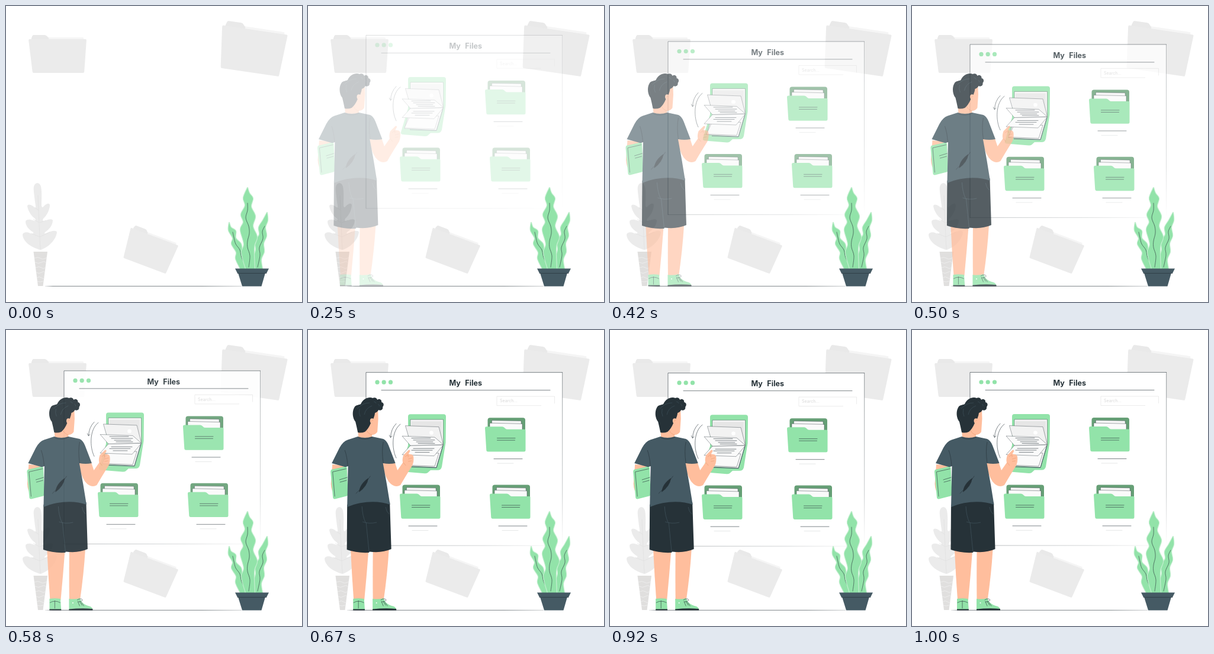
An HTML page that plays this animation: 500 by 500 pixels, repeating every 1040 ms.

```html
<!DOCTYPE html>
<html lang="en">
<head>
<meta charset="utf-8">
<title>My Files</title>
<style>
  html, body { margin: 0; width: 100%; height: 100%; overflow: hidden; background: #fff; }
  svg { display: block; width: 100vw; height: 100vh; }
  text { font-family: Inter, "Open Sans", sans-serif; }
  .thin { fill: none; stroke: #263238; stroke-width: .6; stroke-linecap: round; stroke-linejoin: round; }
  .sheet { stroke: #263238; stroke-width: .4; stroke-linejoin: round; }
  .green { fill: #92e3a9; }
  .slate { fill: #455a64; }
  .dark { fill: #263238; }
  .skin { fill: #ffbe9d; }
  .leaf { fill: #92e3a9; stroke: #c4efd0; stroke-width: 2.4; paint-order: stroke; stroke-linejoin: round; }
</style>
</head>
<body>
<svg viewBox="0 0 500 500">
  <defs>
    <linearGradient id="floorFade" gradientUnits="userSpaceOnUse" x1="66" y1="0" x2="398" y2="0">
      <stop offset="0" stop-color="#263238" stop-opacity=".2"/>
      <stop offset=".04" stop-color="#263238"/>
      <stop offset=".8" stop-color="#263238"/>
      <stop offset="1" stop-color="#263238" stop-opacity=".4"/>
    </linearGradient>
    <linearGradient id="sideFade" gradientUnits="userSpaceOnUse" x1="0" y1="71" x2="0" y2="364">
      <stop offset="0" stop-color="#263238"/>
      <stop offset=".7" stop-color="#263238" stop-opacity=".5"/>
      <stop offset="1" stop-color="#263238" stop-opacity="0"/>
    </linearGradient>
    <linearGradient id="baseFade" gradientUnits="userSpaceOnUse" x1="98" y1="0" x2="430" y2="0">
      <stop offset="0" stop-color="#263238" stop-opacity=".7"/>
      <stop offset=".6" stop-color="#263238" stop-opacity=".4"/>
      <stop offset="1" stop-color="#263238" stop-opacity="0"/>
    </linearGradient>
    <g id="grayFolder">
      <path fill="#f5f5f5" d="M5 0V-3H91Q93 -3 93 -1V2H5Z"/>
      <path fill="#e9e9e9" d="M4 1L6 -5Q6.500 -7 8.500 -7H27Q29 -7 30.500 -5.500L34 -2V1Z"/>
      <path fill="#ebebeb" d="M1.500 0H96Q98 0 97.700 2L94 55Q93.800 57 92 57H8.500Q6.700 57 6.500 55L0 2Q0 0 1.500 0Z"/>
    </g>
    <g id="file">
      <path fill="#669f76" d="M303.500 203V152Q303.500 148 307.500 148H363Q367 148 367 152V203Z"/>
      <path class="sheet" fill="#f5f5f5" d="M310 170L310.500 152.500L360 153.300L361 170Z"/>
      <path class="sheet" fill="#fafafa" d="M307 172V157L362 158.300V172Z"/>
      <path class="green" d="M301 163H328Q330 163 331.500 164.500L333 166Q334.500 167.500 337 167.500H366Q367.500 167.500 367.500 169V203Q367.500 205.300 365 205.300H304Q301.500 205.300 301.300 203L299 165.500Q298.800 163 301 163Z"/>
      <path class="thin" d="M319.500 182.500H350M319.500 186H349.500" stroke-width=".8"/>
      <path class="thin" d="M314 217.500H362"/>
      <path class="thin" d="M320 225H347" opacity=".2"/>
    </g>
  </defs>

  <rect width="500" height="500" fill="#fff"/>
  <use href="#grayFolder" transform="translate(38.200 56)"/>
  <use href="#grayFolder" transform="translate(365.500 32.500) rotate(8.400) scale(1.140 1.260)"/>
  <use href="#grayFolder" transform="translate(211 374.500) rotate(20.500) scale(.876 .918)"/>

  <g id="palePlant">
    <path fill="#ebebeb" d="M58 412C44 408 30 400 28 387C28 382 36 381 41 384C45 386 47 384 46 382C40 379 33 372 33 364C34 360 40 360 45 362C50 364 51 362 49 359C43 355 37 346 36 338C37 333 44 336 49 341C51 341 50 337 49 331C48 320 46 310 47 305C49 297 57 297 59 305C61 315 60 326 60 336C60 341 62 341 64 338C68 334 73 332 74 336C74 345 68 355 63 359C61 363 63 364 66 363C71 360 78 359 79 362C79 371 72 378 66 382C64 385 66 385 70 383C76 380 85 378 86 382C85 394 72 408 58 412Z"/>
    <path fill="none" stroke="#dedede" stroke-width=".6" d="M58 411Q56 370 54 320M56 366L46 360M57 366L68 362M57 390L42 384M57 390L74 382M55 345L48 340"/>
    <path fill="#e0dfde" d="M46.500 415H70L62.500 473H54Z"/>
    <path fill="none" stroke="#f0f0f0" stroke-width=".8" d="M48 426Q54 423 58 426T69 425M49 433Q55 436 60 433T68 434M50 442Q56 439 60 442T67 441M51 450Q56 453 60 450T66 450M52 459Q56 456 60 459T65 459M53 465Q57 467 63 465"/>
  </g>

  <path d="M66 473.300H398" fill="none" stroke="url(#floorFade)" stroke-width=".6"/>

  <g id="board">
    <rect x="98" y="71.500" width="331.700" height="292.500" fill="#fff"/>
    <path class="thin" d="M98 364V71.500H429.700"/>
    <path d="M429.700 71.500V364" fill="none" stroke="url(#sideFade)" stroke-width=".5"/>
    <path d="M98 364H429.700" fill="none" stroke="url(#baseFade)" stroke-width=".5"/>
    <g class="green"><circle cx="117" cy="88" r="3.600"/><circle cx="128.200" cy="88" r="3.600"/><circle cx="139.500" cy="88" r="3.600"/></g>
    <text class="dark" x="266.300" y="94.300" font-size="12.600" font-weight="700" word-spacing="4.500" text-anchor="middle">My Files</text>
    <path class="thin" d="M124 101.500H409" stroke-width=".8"/>
    <path d="M416.500 124V112H319V127.500H394" fill="none" stroke="#e4e4e4" stroke-width=".7"/>
    <text x="324" y="122.300" font-size="7.100" fill="#d8d8d8">Search...</text>

    <use href="#file"/>
    <use href="#file" x="-144" y="113.400"/>
    <use href="#file" x="8" y="113.400"/>

    <path class="green" d="M169 146Q169 142 173 142H229Q233 142 233 146L232.500 190L226 231Q224.500 236.500 219 236.500H207L202 241Q200 242.300 197 242L160 239Q156 238.500 157 235L169 195Z"/>
    <path class="sheet" fill="#f5f5f5" d="M173 151H228.500V193L217 232L163 229L173 195Z"/>
    <path fill="#e6e6e6" d="M175 154H226V185H175Z"/>
    <path d="M172 231L217 232.500L228 195" fill="none" stroke="#455a64" stroke-width="1"/>
    <path class="sheet" fill="#fafafa" d="M163 228L173 206L221 208L214 230Z"/>
    <path class="sheet" fill="#f2f2f2" d="M164.500 161.500L221 163.500L228.500 193L173 191Z"/>
    <circle cx="208.500" cy="173.500" r="3.300" fill="#fff"/>
    <path class="sheet" fill="#fafafa" d="M173 195L228.500 194L213 212.500L159 210.500Z"/>
    <path class="sheet" fill="#fafafa" d="M159 179L214 181L228.500 193.500L173 195Z"/>
    <path class="thin" d="M175 182.500H207M178 185.700H214M183 188.800H211M186 191.500H214M178 200H213M175 203H210M181 206.500H205"/>
    <path class="thin" d="M156 159C141 170 141 200 149 216M149 158Q140 167 139.500 181M137.500 177.500L139.300 181.500L142 179"/>
  </g>

  <g id="man">
    <path class="skin" d="M41 227L38.500 260Q39 274 46 277L62 262L60 229Z"/>
    <path class="skin" d="M72 373Q74 415 77 456H95Q99 414 102 374Z"/>
    <path class="skin" d="M109.500 374Q109 420 109.500 457H127.500Q134 412 136.500 371Z"/>
    <path class="green" d="M76 454Q85 452.500 94.500 454L95.800 472.500H76Z"/>
    <path class="green" d="M109 454Q118 455.500 127 453L131 460Q136 465 145 467Q149 469 149 473H109Z"/>
    <path class="dark" d="M76 471.500H95.800V473.500H76ZM109 471.500Q130 469.500 149 471V473.500H109Z"/>
    <path class="thin" d="M77 460.500Q85 455.500 94 460.500M85 457.500V470M123 456Q129 452 132 456Q129 460 124 459M124 459L127 466M127 458L131 465M130 460L134 466"/>
    <circle cx="115.500" cy="461" r="1" fill="#fff"/>

    <path class="dark" d="M66 295L65.500 371Q82 377 102.500 376L104 374.500Q125 377 140.500 370L138 291Q102 282 66 295Z"/>
    <path fill="none" stroke="#455a64" stroke-width=".6" d="M103 375Q101 355 98 325M92 324Q103 328 116 325M91 298Q92 315 97 325M131 299Q132 307 137 311"/>

    <path class="skin" d="M126 222Q127 243 136 256Q146 268 156 262Q164 248 176 229Q179 222 178 214Q177 210 173 210L169.500 209.500L172.300 204.500Q172 201.500 169.500 203L161 211.500Q158.500 219 160 224L151 237L146 222Z"/>
    <path fill="none" stroke="#eb996e" stroke-width=".6" d="M164 214L169 210.500L169 215M176 216L169 218M175 221L169 222M161 224L165 229"/>

    <path class="skin" d="M84 168L85 182Q98 187 108 181V177Q114 177 117 172L118.500 150L118 134L99 142Z"/>
    <path fill="none" stroke="#eb996e" stroke-width=".6" d="M108 177Q102 176 99 170"/>
    <path class="dark" d="M84 173Q82 163 80 155C75 149 74 138 78 131C80 126 86 127 89 125C93 115 104 112 109 115C113 113 116 115 117 118C120 115 125 118 124 122C129 123 128 128 126 130C127 134 123 137 119 135Q117 139 113 140Q112 149 106 157Q102 167 96 172Q90 174.500 84 173Z"/>
    <path fill="none" stroke="#455a64" stroke-width=".5" d="M83 133Q92 123 104 123M95 143Q97 132 108 128M88 146Q85 140 87 133M111 121Q114 121 115 124M118 125Q121 126 120 129"/>
    <ellipse class="skin" cx="108" cy="153.500" rx="3.400" ry="4.200"/>
    <path fill="none" stroke="#eb996e" stroke-width=".5" d="M106.500 155Q108 151 110 153"/>

    <path class="green" d="M40.500 235.500L63 230.500Q65.500 230 65.600 233L67.500 277Q67.500 280 65 280.500L45.500 285.500Q42.500 286 42 283L38 239.500Q38 236 40.500 235.500Z"/>
    <path class="thin" d="M41.500 240L45 281M42 239.500L64 234.500M53 253L66 249M54 257L65 254"/>
    <path class="slate" d="M84 180Q96 184 108 180L127 184Q133 187 136 195L147.500 225Q137 227 126.500 225L133 261L138.500 295C120 288 92 288 66 299L67.500 230L63 231.500L40 225L53 199Q59 188 67 185.500Z"/>
    <path fill="none" stroke="#263238" stroke-width=".6" d="M127 225Q124 204 127 189M67 230Q66 214 62 203M85 182Q97 187 108 181"/>
    <path class="dark" d="M86 274Q87 260 102 250Q100 264 86 274Z"/>
    <path class="thin" d="M81 276Q93 265 105 247"/>
  </g>

  <g id="greenPlant"></g>
  <path class="slate" d="M392 451H438L431.500 473.500H399Z"/>
  <path class="slate" d="M387 443.500H444L440 451.500H391Z"/>
  <path class="thin" d="M391 451.500H440"/>
</svg>
<script>
  const $ = id => document.getElementById(id);

  // Catmull-Rom curve through "x,y" points
  function curve(text, open = 'M') {
    const p = text.split(' ').map(s => s.split(',').map(Number));
    let d = open + p[0];
    for (let i = 0; i < p.length - 1; i++) {
      const a = p[i - 1] || p[i], b = p[i], c = p[i + 1], e = p[i + 2] || c;
      const handle = (from, to, at, sign) => [0, 1].map(k => at[k] + sign * (to[k] - from[k]) / 6);
      d += 'C' + [handle(a, c, b, 1), handle(b, e, c, -1), c].join(' ');
    }
    return d;
  }

  // left side up to the tip, right side down, midrib
  const leaves = [
    ['396,444 388,427 389,416 381,402 383,392 376,379 377,366',
     '377,366 380,374 388,380 388,392 397,402 399,417 405,428 408,444',
     '383,382 385,391 388,402 395,412 398,425 406,441'],
    ['420,444 418,427 422,412 421,397 428,386 427,374 434,362 441,349',
     '441,349 442,362 438,374 440,388 435,401 436,415 431,428 433,444',
     '437,372 433,381 434,393 428,408 429,421 425,441'],
    ['405,444 398,417 402,402 396,378 401,365 397,352 404,337 401,324 408,307',
     '408,307 411,316 417,325 414,339 421,355 417,372 424,390 419,408 420,444',
     '408,333 408,345 405,358 410,372 411,384 408,397 408,408 412,422 410,441']
  ];
  $('greenPlant').innerHTML = leaves.map(([left, right, rib]) =>
    `<path class="leaf" d="${curve(left)}${curve(right, 'L')}Z"/><path class="thin" d="${curve(rib)}"/>`).join('');

  const LOOP = 1040, STEP = 125 / 3, LEAD = 20, SHIFT = 30;

  const cubic = (t, a, b) => 3 * (1 - t) * (1 - t) * t * a + 3 * (1 - t) * t * t * b + t * t * t;

  // cubic-bezier(.36, -.01, .5, 1.38): overshoots, then settles
  function ease(x) {
    if (x >= 1) return 1;
    let lo = 0, hi = 1;
    for (let i = 0; i < 30; i++) {
      const mid = (lo + hi) / 2;
      if (cubic(mid, .36, .5) < x) lo = mid; else hi = mid;
    }
    return cubic(lo, -.01, 1.38);
  }

  // 24 steps a second, each starting on a multiple of 10 ms
  function stepAt(ms) {
    const k = Math.floor(ms / STEP) + 1;
    return Math.round(k * STEP / 10) * 10 > ms ? k - 1 : k;
  }

  function draw(ms) {
    const k = stepAt(ms);
    const p = k < 3 ? 0 : ease((k * STEP + LEAD) / 1000);
    const offset = SHIFT * (p - 1);
    const pose = (id, x, y) => {
      $(id).setAttribute('transform', `translate(${x} ${y})`);
      $(id).setAttribute('opacity', Math.min(1, p));
    };
    pose('board', 0, offset);
    pose('man', offset, 0);
  }

  const start = performance.now();
  function tick() {
    draw((performance.now() - start) % LOOP);
    requestAnimationFrame(tick);
  }
  tick();
</script>
</body>
</html>
```
